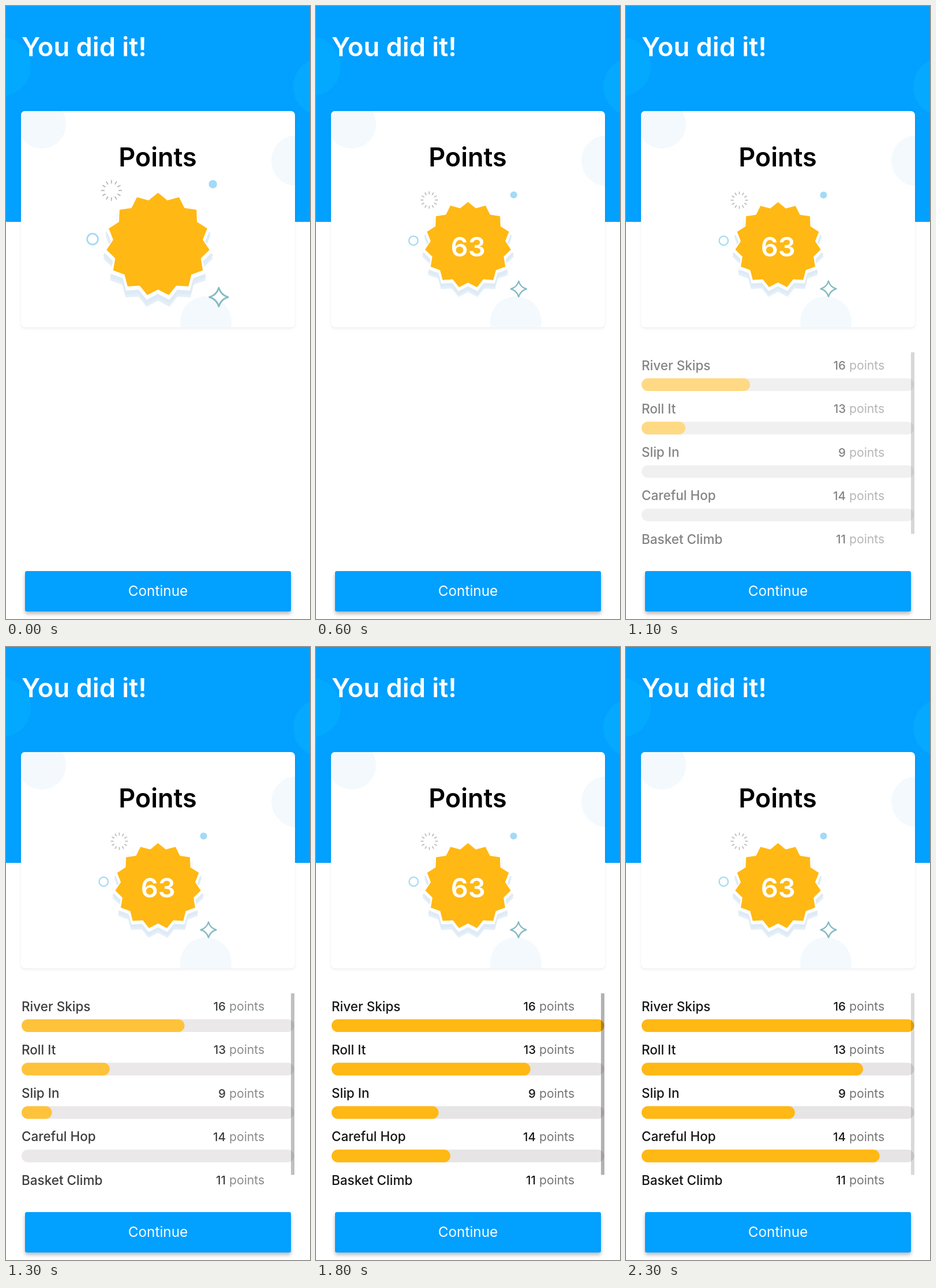
An HTML page for the animation above (2.4 s loop, 527 by 1062 pixels).

```html
<!DOCTYPE html>
<html lang="en">
<head>
<meta charset="utf-8">
<title>Points</title>
<style>
  html, body { margin: 0; width: 100%; height: 100%; overflow: hidden; background: #fff; }
  svg { display: block; width: 527px; height: 1062px; font-family: Inter, "Open Sans", sans-serif; }
  .card { filter: drop-shadow(0 2px 2px rgba(60, 70, 110, .1)); }
  .button { filter: drop-shadow(0 4px 3px rgba(0, 0, 0, .28)); }
</style>
</head>
<body>
<svg viewBox="0 0 527 1062">
  <defs>
    <clipPath id="cardClip"><rect x="26" y="182" width="475" height="374.5" rx="7"/></clipPath>
  </defs>

  <rect width="527" height="374" fill="#02a0ff"/>
  <circle cx="-8" cy="105" r="51" fill="#03a9ff"/>
  <circle cx="548.5" cy="140" r="50.5" fill="#05a9ff"/>
  <text x="27" y="87" font-size="45.3" font-weight="600" fill="#fff">You did it!</text>

  <rect class="card" x="26" y="182" width="475" height="374.5" rx="7" fill="#fff"/>
  <g clip-path="url(#cardClip)" fill="#f3f9fd">
    <circle cx="62" cy="205" r="42"/>
    <circle cx="504" cy="268" r="44"/>
    <circle cx="346.5" cy="547.5" r="44.5"/>
  </g>
  <text x="263" y="278" font-size="45" font-weight="600" text-anchor="middle">Points</text>

  <g id="badge">
    <g id="burst" stroke="#b8b8b8" stroke-width="1.6"></g>
    <circle cx="169.3" cy="406.5" r="7.8" fill="none" stroke="#a5daf2" stroke-width="2.3"/>
    <circle cx="342.5" cy="327.5" r="6" fill="#a2daf7"/>
    <path d="M351 476.5Q354 487 364.5 490Q354 493 351 503.5Q348 493 337.5 490Q348 487 351 476.5Z"
      fill="none" stroke="#86bbc1" stroke-width="2.4" stroke-linejoin="round"/>
    <g id="stars"></g>
    <text id="score" x="263.7" y="433.5" font-size="47" font-weight="600" fill="#fff" text-anchor="middle">63</text>
  </g>

  <g id="list">
    <g id="rows"></g>
    <rect id="scrollbar" x="494" y="600" width="6" height="314.5" fill="#000"/>
  </g>

  <rect class="button" x="33" y="979" width="461" height="70" rx="3" fill="#02a0ff"/>
  <text x="263.5" y="1022" font-size="24.3" fill="#fff" text-anchor="middle">Continue</text>
</svg>

<script>
const LOOP = 2400, STEP = 100;
const BAR_X = 27, BAR_WIDTH = 472.5, BAR_TIME = 1000, TOP_SCORE = 16;
const ROWS = [["River Skips", 16], ["Roll It", 13], ["Slip In", 9], ["Careful Hop", 14], ["Basket Climb", 11]];

const byId = id => document.getElementById(id);
const ramp = (t, from, to) => Math.min(1, Math.max(0, (t - from) / (to - from)));
const easeInOut = p => p < .5 ? 4 * p ** 3 : 1 - 4 * (1 - p) ** 3;

function add(parent, tag, attrs, text = "") {
  const node = document.createElementNS("http://www.w3.org/2000/svg", tag);
  for (const key in attrs) node.setAttribute(key, attrs[key]);
  node.textContent = text;
  parent.append(node);
  return node;
}

function addStar(cy, radius, fill) {
  const points = Array.from({ length: 30 }, (_, i) => {
    const r = i % 2 ? radius * .87 : radius, a = i * Math.PI / 15;
    return `${(263.5 + r * Math.sin(a)).toFixed(2)},${(cy - r * Math.cos(a)).toFixed(2)}`;
  });
  add(byId("stars"), "polygon", { points: points.join(" "), fill });
}

addStar(426, 79.5, "#e4eff8");
addStar(422, 79.5, "#deebf6");
addStar(417, 78.5, "#fff");
addStar(414.2, 74.5, "#ffb814");

for (let i = 0; i < 12; i++) {
  add(byId("burst"), "path", { d: "M0-10V-15", transform: `translate(196.5 336.5) rotate(${i * 30})` });
}

const bars = ROWS.map(([name, score], i) => {
  const rows = byId("rows"), y = 75.25 * i;
  const label = { "font-weight": 500, fill: "#161616" };
  add(rows, "text", { ...label, x: 27, y: 630.5 + y, "font-size": 22.5 }, name);
  add(rows, "text", { ...label, x: 381, y: 630 + y, "font-size": 20.5, "text-anchor": "end" }, score);
  add(rows, "text", { x: 387, y: 630 + y, "font-size": 21.2, fill: "#757575" }, "points");
  if (i === ROWS.length - 1) return null;
  const shape = { x: BAR_X, y: 645 + y, height: 22, rx: 11 };
  add(rows, "rect", { ...shape, width: BAR_WIDTH, fill: "#e6e4e5" });
  return add(rows, "rect", { ...shape, width: 0, fill: "#ffb814" });
});

function draw(t) {
  const scale = 1.204 - .204 * easeInOut(ramp(t, 100, 700));
  byId("badge").setAttribute("transform",
    `translate(263.5 419.5) scale(${scale}) translate(-263.5 -419.5)`);
  byId("score").setAttribute("opacity", ramp(t, 0, 200));
  byId("list").setAttribute("opacity", ramp(t, 755, 1410));
  byId("scrollbar").setAttribute("opacity", .3 * (1 - ramp(t, 2150, 2450)));
  bars.forEach((bar, i) => {
    if (!bar) return;
    const start = 702 + 200 * i;
    const width = BAR_WIDTH * ROWS[i][1] / TOP_SCORE * ramp(t, start, start + BAR_TIME);
    bar.setAttribute("width", width);
    bar.setAttribute("rx", Math.min(11, width / 2));
  });
}

const begin = performance.now();
function tick() {
  const t = (performance.now() - begin) % LOOP;
  draw(Math.floor(t / STEP) * STEP);
  requestAnimationFrame(tick);
}
tick();
</script>
</body>
</html>
```
